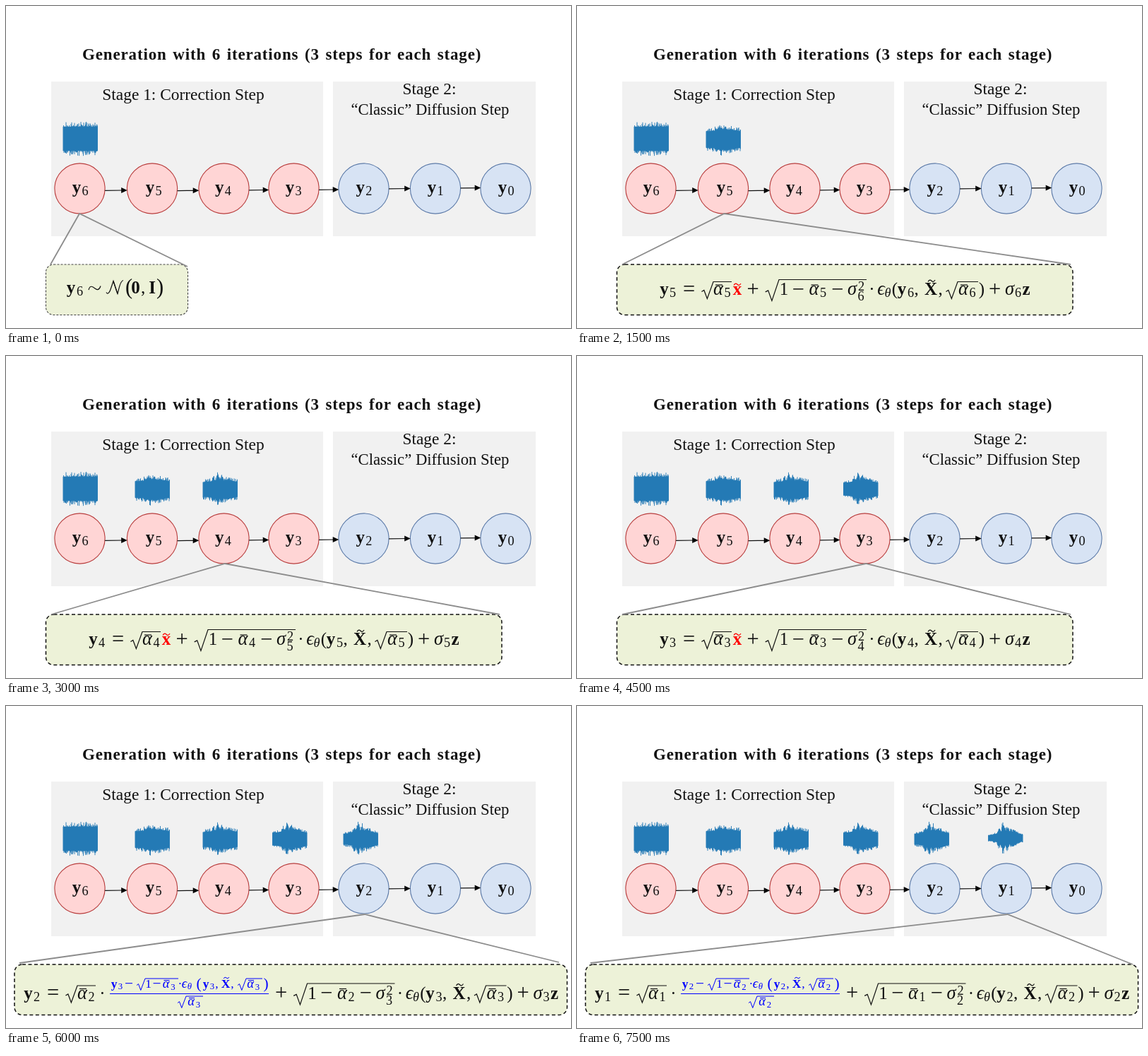
These frames come from a looping animation (800x456 px, 8 s). An HTML page:

```html
<!DOCTYPE html>
<html lang="en">
<head>
<meta charset="utf-8">
<title>Generation steps</title>
<style>
html, body { margin: 0; width: 100%; height: 100%; overflow: hidden; background: #fff; }
svg { display: block; width: 100vw; height: 100vh; }
text { font-family: "Liberation Serif", "DejaVu Serif", serif; text-anchor: middle; fill: currentColor; }
.title { font-size: 23px; font-weight: bold; letter-spacing: .85px; word-spacing: 2px; text-anchor: start; }
.heading { font-size: 23.4px; }
.heading.tight { font-size: 22.7px; }
.math { font-size: 25px; }
.small { font-size: 17.5px; color: #00f; }
.n { font-size: 1em; }
.b { font-size: 1em; font-weight: bold; }
.i { font-size: 1.06em; font-style: italic; }
.s { font-size: .73em; }
.t { font-size: .73em; font-style: italic; }
.o { font-size: 1.22em; }
.line { fill: none; stroke: currentColor; stroke-width: 1.2; }
.small .line { stroke-width: 1; }
.pointer { fill: none; stroke: #8c8c8c; stroke-width: 1.8; }
.box { fill: #edf2d8; stroke: #111; stroke-width: 1.5; stroke-dasharray: 5 3.5; }
.box.light { stroke: #444; stroke-width: 1.1; stroke-dasharray: 3 2; }
.wave { fill: none; stroke: #1f77b4; stroke-width: .9; }
.timed { animation: 8s step-end infinite; }
</style>
</head>
<body>
<svg id="stage" viewBox="0 0 800 456" color="#111"></svg>
<script>
const stage = document.getElementById('stage');
const LOOP = 8000, HOLD = 1500, STEPS = 6;
const nodeX = [104.5, 207, 308.5, 407.5, 506.5, 608, 707.5];
const labelX = [105, 209, 307.3, 407, 506.7, 608, 708];

const text = (x, y, s, cls) => `<text x="${x}" y="${y}" class="${cls}">${s}</text>`;
const path = (d, cls = 'line') => `<path d="${d}" class="${cls}"/>`;
const shift = (x, y, body) => `<g transform="translate(${x} ${y})">${body}</g>`;

// Each item is [x, text, class, y offset]; the baseline is at zero.
const row = items => items.map(([x, s, cls, dy = 0]) => text(x, dy, s, cls)).join('');
const hat = (x, y, w = 5) =>
  path(`M${x - w} ${y + 1.5}q${w / 2} ${-w * .8} ${w} ${-w * .25}t${w} ${-w * .25}`);
const root = (x, w, top, bottom, end) => {
  const mid = top + (bottom - top) * .58;
  return path(`M${x + w * .08} ${mid}L${x + w * .27} ${mid - 2}L${x + w * .52} ${bottom}L${x + w} ${top}H${end}`);
};
const alpha = (x, k, small) => row([[x, 'α', 'i'], [x + (small ? 10 : 13), k, 's', 3]]) +
  path(small ? `M${x - 3} -10h8` : `M${x - 4} -14h10`);

function timed(name, from, to, body) {
  const pct = ms => ms / LOOP * 100 + '%';
  const off = to < LOOP ? `${pct(to)},100%{opacity:0}` : '100%{opacity:1}';
  const start = from ? '0%{opacity:0}' : '';
  return `<style>@keyframes ${name}{${start}${pct(from)}{opacity:1}${off}}</style>
    <g class="timed" style="animation-name:${name}">${body}</g>`;
}

function randomFrom(seed) {
  return () => {
    seed = (seed * 1664525 + 1013904223) % 4294967296;
    return seed / 4294967296;
  };
}

const waves = [ // left edge, centre, noise level, signal level
  [81, 188, 19, 0], [183, 189, 13, .35], [279, 189, 11.5, .5],
  [377.5, 188.5, 10, .62], [478, 188.5, 8.5, .75], [582.5, 187, 4.5, .95]
];
function wave([x, y, noise, signal], seed) {
  const rnd = randomFrom(seed + 11);
  const bell = (u, c, w) => Math.exp(-(((u - c) / w) ** 2));
  let d = '';
  for (let u = 0; u <= 1; u += 1 / 98) {
    const pulse = .7 + .3 * Math.cos(2 * Math.PI * (u - .42) / .13);
    const voice = signal * (22 * bell(u, .42, .16) * pulse + 8 * bell(u, .7, .2));
    const reach = () => Math.min(24.5, noise * (.9 + .38 * rnd() ** 4) + voice * (.5 + .5 * rnd()));
    d += `M${(x + u * 49).toFixed(1)} ${(y - reach()).toFixed(1)}V${(y + reach()).toFixed(1)}`;
  }
  return path(d, 'wave');
}

const head = n => row([[123.5, 'y', 'b'], [135.5, n, 's', 3], [158.5, '=', 'o', 1.5]]) +
  root(175, 18, -18.5, 5.5, 219) + alpha(200, n);

const tail = (n, prev) => row([
  [249, '+', 'o', 1.5], [293, '1', 'n'], [313, '−', 'o', 1.5], [368.5, '−', 'o', 1.5],
  [389.5, 'σ', 'i'], [402.5, '2', 's', -6], [402, prev, 's', 8], [417.5, '·', 'n'],
  [430.5, 'ϵ', 'i'], [440, 'θ', 't', 3], [450, '(', 'n'], [460, 'y', 'b'], [472.5, prev, 's', 3],
  [480.5, ',', 'n'], [501, 'X', 'b'], [514.5, ',', 'n'], [573, ')', 'n'], [591.5, '+', 'o', 1.5],
  [612.5, 'σ', 'i'], [624.5, prev, 's', 3], [636, 'z', 'b']
]) + root(265, 21, -21.5, 8.5, 410) + alpha(335.5, n) + hat(502, -20) +
  root(521, 18, -18.5, 5.5, 568) + alpha(547, prev);

const correction = (n, prev) => shift(0, 409, head(n) +
  `<g color="#f00">${text(227, 0, 'x', 'b')}${hat(227, -15)}</g>` + tail(n, prev));

const fraction = prev => `<g class="small">` + path('M147 407.5H372') +
  shift(0, 398.5, row([
    [153, 'y', 'b'], [162, prev, 's', 2], [174, '−', 'o', 1], [201.5, '1', 'n'], [213.5, '−', 'o', 1],
    [246.5, '·', 'n'], [252.5, 'ϵ', 'i'], [260, 'θ', 't', 2], [273, '(', 'o', 1], [283, 'y', 'b'],
    [292, prev, 's', 2], [298.5, ',', 'n'], [311, 'X', 'b'], [320.5, ',', 'n'], [368, ')', 'o', 1]
  ]) + root(184, 13, -12.5, 4, 244) + alpha(226.5, prev, true) + hat(312, -14, 4) +
    root(327, 13, -12.5, 4, 363) + alpha(346, prev, true)) +
  shift(0, 423.5, root(242, 13, -12.5, 4, 279) + alpha(262, prev, true)) + '</g>';

const classic = (n, prev) => shift(-92, 414.5, head(n)) + text(136.5, 414.5, '·', 'n') +
  fraction(prev) + shift(140.5, 414.5, tail(n, prev));

const prior = shift(0, 406.5, row([
  [92, 'y', 'b'], [104.5, 6, 's', 3], [174, '(', 'o', 1], [183.5, '0', 'b'],
  [194, ',', 'n'], [207, 'I', 'b'], [218, ')', 'o', 1]
]) + path('M117 -4.5C119 -12 123 -9 126 -6.5S132 -4 134 -10') +
  '<g style="stroke-width:1.8">' +
  path('M142 -1C144 3 147 -1 149 -8L152 -17C154 -11 156 -4 158 1C160 -5 161 -17 166 -18') +
  path('M152 -17L158 1') + '</g>');

function callout(step) {
  const n = 6 - step, late = step > 3;
  const [left, right] = step === 0 ? [56.5, 257.5] : late ? [12, 794.5] : [56.5, 702];
  const [tipX, tipY] = [nodeX[step] + (step ? 1.5 : -.5), late ? 295 : 294];
  const ends = step === 0 ? ['63 366', '257 369']
    : late ? ['19 364', step === 4 ? '783 363' : '787 366'] : ['64 366', '699 366'];
  const formula = step === 0 ? prior : (late ? classic : correction)(n, n + 1);
  return `<rect x="${left}" y="366" width="${right - left}" height="71.5" rx="11" class="box ${step ? '' : 'light'}"/>` +
    path(`M${ends[0]}L${tipX} ${tipY}L${ends[1]}`, 'pointer') + `<g class="math">${formula}</g>`;
}

function node(x, i) {
  const [fill, edge] = i < 4 ? ['#ffd5d5', '#b83c3c'] : ['#d7e3f4', '#5c7aa8'];
  return `<circle cx="${x}" cy="258.5" r="35.6" fill="${fill}" stroke="${edge}" stroke-width="1.1"/>` +
    `<g class="math">${text(labelX[i] - 5, 265, 'y', 'b')}${text(labelX[i] + 7, 268, 6 - i, 's')}</g>`;
}

const arrowY = [261, 261.3, 260.5, 260, 258.5, 257.6];
function arrow(y, i) {
  const from = nodeX[i] + 35.6, to = nodeX[i + 1] - 35.3;
  return path(`M${from} ${y + .3}L${to - 6} ${y}`) +
    `<path d="M${to} ${y}l-8.5 -4v8z" fill="#000"/>`;
}

const panel = (x, w) => `<rect x="${x}" y="107" width="${w}" height="219" fill="#f1f1f1"/>`;

stage.innerHTML = panel(64, 385) + panel(463, 287) +
  text(108, 76, 'Generation with 6 iterations (3 steps for each stage)', 'title') +
  text(251, 132.5, 'Stage 1: Correction Step', 'heading') +
  text(599.5, 124.5, 'Stage 2:', 'heading') +
  text(600.5, 154, '“Classic” Diffusion Step', 'heading tight') +
  nodeX.map(node).join('') + arrowY.map(arrow).join('') +
  waves.map((w, i) => timed('wave' + i, i * HOLD, LOOP, wave(w, i))).join('') +
  Array.from({ length: STEPS }, (_, i) =>
    timed('callout' + i, i * HOLD, Math.min(LOOP, (i + 1) * HOLD), callout(i))).join('');
</script>
</body>
</html>
```
